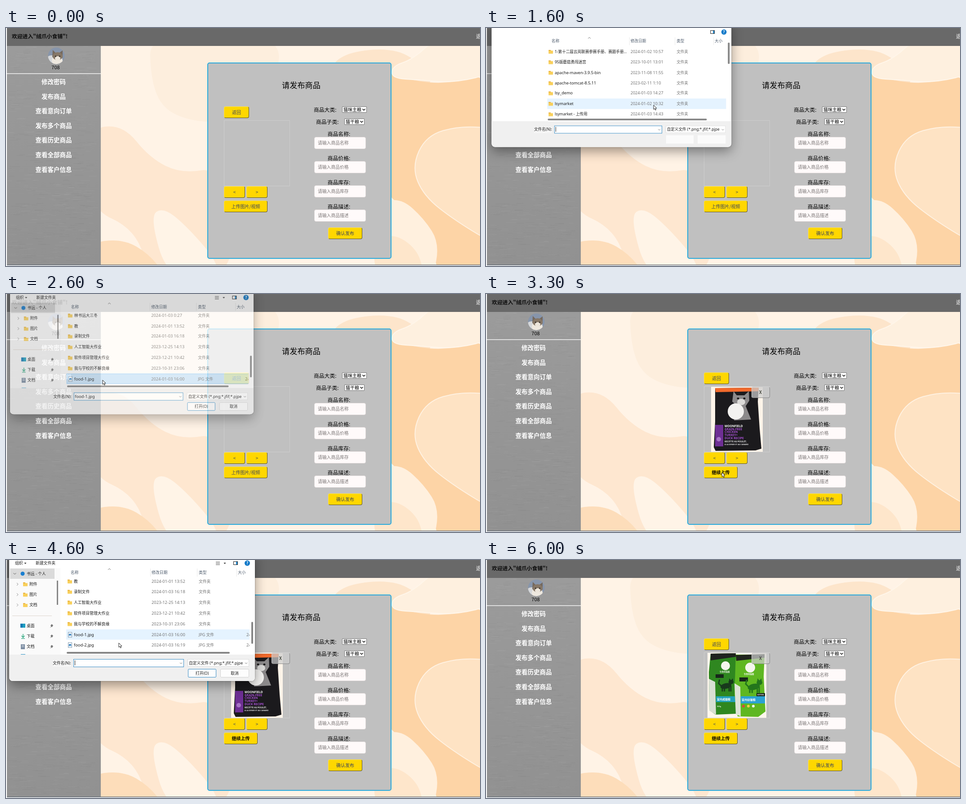
These frames come from a looping animation (1055 px wide and 531 px high, 8000 ms). An HTML page with a canvas:

```html
<!DOCTYPE html>
<html lang="zh-CN">
<head>
<meta charset="utf-8">
<style>
html, body { margin: 0; width: 100%; height: 100%; overflow: hidden; background: #fff; }
#stage { position: relative; width: 1055px; height: 531px; overflow: hidden;
  font-family: "Noto Sans CJK SC", "Noto Sans CJK", "Noto Sans", sans-serif; }
#stage div, canvas, svg { position: absolute; box-sizing: border-box; }
.t { white-space: pre; }
.btn { background: #ffd700; border-radius: 4px; border: 1px solid; border-color: #ffe24a #59532a #59532a #ffe24a; }
.field { background: #fffafa; border-radius: 4px; border: 1px solid #e2dcdc; }
.sel { background: #fff; border: 1px solid #767676; border-radius: 1px; }
.win { transform-origin: 230px 88px; }
.shade { border-radius: 8px; box-shadow: 0 10px 26px rgba(0,0,0,.38), 0 0 3px rgba(0,0,0,.35); }
.dialog { background: #fff; border-radius: 8px; overflow: hidden; }
</style>
</head>
<body>
<div id="stage"></div>
<script>
const stage = document.getElementById('stage');
const LATIN = '"Noto Sans","Noto Sans CJK SC",sans-serif';

function box(parent, x, y, w, h, css = '', cls = '') {
  const d = document.createElement('div');
  d.className = cls;
  d.style.cssText = `left:${x}px;top:${y}px;width:${w}px;height:${h}px;${css}`;
  parent.appendChild(d);
  return d;
}

// Text centred vertically on cy; with mid set, centred horizontally on x too.
function text(parent, x, cy, size, str, css = '', mid = false) {
  const d = box(parent, mid ? x - 150 : x, cy - 10, 300, 20,
    `font-size:${size}px;line-height:20px;text-align:${mid ? 'center' : 'left'};${css}`, 't');
  d.textContent = str;
  return d;
}

function canvas(parent, x, y, w, h) {
  const c = document.createElement('canvas');
  c.width = w; c.height = h;
  c.style.cssText = `left:${x}px;top:${y}px`;
  parent.appendChild(c);
  const g = c.getContext('2d');
  g.translate(-x, -y);
  return g;
}

function poly(g, color, ...p) {
  g.fillStyle = color;
  g.beginPath();
  for (let i = 0; i < p.length; i += 2) g.lineTo(p[i], p[i + 1]);
  g.closePath();
  g.fill();
}

function rect(g, color, x, y, w, h) { g.fillStyle = color; g.fillRect(x, y, w, h); }

function oval(g, color, x, y, rx, ry = rx, rot = 0) {
  g.fillStyle = color;
  g.beginPath();
  g.ellipse(x, y, rx, ry, rot, 0, 7);
  g.fill();
}

function line(g, color, width, ...p) {
  g.strokeStyle = color;
  g.lineWidth = width;
  g.beginPath();
  for (let i = 0; i < p.length; i += 2) g.lineTo(p[i], p[i + 1]);
  g.stroke();
}

// Smooth closed shape through the midpoints of p.
function blob(g, fill, edge, ...p) {
  const n = p.length / 2, at = i => [p[(i % n) * 2], p[(i % n) * 2 + 1]];
  g.beginPath();
  for (let i = 0; i <= n; i++) {
    const [ax, ay] = at(i), [bx, by] = at(i + 1);
    const mx = (ax + bx) / 2, my = (ay + by) / 2;
    i ? g.quadraticCurveTo(ax, ay, mx, my) : g.moveTo(mx, my);
  }
  g.fillStyle = fill;
  g.fill();
  if (edge) { g.strokeStyle = edge; g.lineWidth = 2; g.stroke(); }
}

function paintPage() {
  const g = canvas(stage, 0, 0, 1055, 531);
  rect(g, '#fff', 0, 0, 1055, 531);
  g.save();
  g.beginPath(); g.rect(211, 40, 844, 488); g.clip();
  rect(g, '#fff3e6', 211, 40, 844, 488);
  blob(g, '#fdeedd', null, 320, 10, 322, 110, 345, 175, 400, 205, 480, 212, 620, 90, 590, 10);
  blob(g, '#fee7d0', null, 180, 225, 260, 215, 320, 290, 390, 325, 480, 310, 520, 560, 320, 560, 290, 450, 180, 400);
  blob(g, '#fdddba', null, 180, 480, 260, 470, 320, 505, 360, 560, 180, 560);
  blob(g, '#fff4e7', null, 320, 420, 350, 400, 400, 440, 470, 520, 470, 560, 360, 560);
  blob(g, '#fde5cb', null, 720, 85, 760, 55, 840, 45, 900, 60, 960, 120, 900, 140, 760, 130);
  blob(g, '#fdd4a6', null, 830, 90, 900, 118, 990, 125, 1090, 95, 1090, 560, 960, 560, 950, 470, 880, 400, 830, 350);
  blob(g, '#fef0df', '#fff6ea', 860, 85, 905, 70, 960, 20, 1090, 20, 1090, 100, 1000, 122, 920, 116, 858, 112);
  blob(g, '#fee3c4', '#fff2e2', 1100, 225, 1010, 218, 935, 240, 903, 310, 930, 375, 1000, 430, 1100, 490);
  blob(g, '#fff0de', null, 830, 390, 880, 380, 930, 425, 965, 480, 950, 560, 830, 560);
  blob(g, '#fee6cb', null, 820, 470, 870, 460, 920, 500, 930, 560, 820, 560);
  g.restore();
  rect(g, '#696969', 2, 0, 1053, 40);
  const grey = g.createLinearGradient(0, 40, 0, 528);
  grey.addColorStop(0, '#9b9b9b');
  grey.addColorStop(1, '#919191');
  rect(g, grey, 2, 40, 209, 488);
  let seed = 7;
  const rnd = () => (seed = seed * 16807 % 2147483647) / 2147483647;
  for (let i = 0; i < 500; i++) {
    const x = 2 + rnd() * 185;
    rect(g, i % 2 ? 'rgba(255,255,255,.05)' : 'rgba(0,0,0,.04)', x, 40 + rnd() * 487, 8 + rnd() * 16, 1);
  }
  rect(g, '#f4f4f4', 2, 101, 209, 1.5);
  rect(g, '#5d6670', 2, 528, 1053, 1.5);
  // avatar
  g.save();
  g.beginPath(); g.arc(112, 62, 18.5, 0, 7); g.clip();
  rect(g, '#8795ab', 90, 40, 44, 44);
  oval(g, '#d5d7da', 101, 76, 14, 15);
  oval(g, '#eee8df', 114, 73, 12, 11);
  poly(g, '#75695e', 103, 65, 104, 49, 111, 56, 119, 55, 126, 50, 126, 66);
  oval(g, '#867767', 115, 63, 11, 9);
  oval(g, '#ece5db', 115, 68, 6, 5);
  oval(g, '#332f2c', 110.5, 63, 1.6);
  oval(g, '#332f2c', 119.5, 63, 1.6);
  g.restore();
}

function button(x, y, w, str, css = 'color:#39445c') {
  const b = box(stage, x, y, w, 26, '', 'btn');
  text(b, w / 2 - 1, 12, 10, str, 'font-weight:500;' + css, true);
  return b;
}

function select(x, y, w, str, label, lx) {
  text(stage, lx, y + 6.5, 11.8, label);
  const s = box(stage, x, y, w, 14, '', 'sel');
  text(s, 2, 6, 10, str);
  const g = canvas(s, w - 12, 2, 9, 9);
  line(g, '#111', 1.5, w - 10.5, 4.5, w - 7.5, 7.5, w - 4.5, 4.5);
}

function buildPage() {
  paintPage();
  text(stage, 13, 18, 11.8, '欢迎进入"绒爪小食铺"!', 'font-weight:700;color:#0c0c0c');
  text(stage, 1046, 18, 11.8, '退出', 'color:#fff');
  text(stage, 110.5, 87, 11, '708', '', true);
  ['修改密码', '发布商品', '查看意向订单', '发布多个商品', '查看历史商品', '查看全部商品', '查看客户信息']
    .forEach((s, i) => text(stage, 106, 119 + i * 32.6, 13.5, s, 'font-weight:700;color:#fff', true));
  box(stage, 448, 76.5, 410, 438, 'background:#c0c0c0;border:2px solid #27a9dc;border-radius:5px');
  text(stage, 657, 127, 17.2, '请发布商品', 'font-weight:500', true);
  button(485, 175, 56, '返回');
  box(stage, 485, 206, 147, 147, 'border:1px solid #cdcdcd');
  button(485, 353, 47, '<');
  button(535, 353, 47, '>');
  select(748, 175, 55, '猫咪主粮', '商品大类:', 685);
  select(753, 202, 45, '猫干粮', '商品子类:', 690);
  ['名称', '价格', '库存', '描述'].forEach((s, i) => {
    const y = 236 + i * 54;
    text(stage, 741, y, 11.8, `商品${s}:`, '', true);
    const f = box(stage, 686, y + 6.5, 115, 27, '', 'field');
    text(f, 7, 12.5, 9.8, '请输入商品' + s, 'color:#7a7676');
  });
  button(717, 445, 76, '确认发布');
}

function words(g, color, size, x, y, ...lines) {
  g.fillStyle = color;
  g.font = `700 ${size}px ${LATIN}`;
  lines.forEach((s, i) => g.fillText(s, x, y + i * 6.7));
}

function cat(g, color, x, y, k) {
  g.save();
  g.translate(x, y);
  g.scale(k, k);
  oval(g, color, 0, 0, 13, 6.5, -.2);
  oval(g, color, 12, -9, 6, 5);
  poly(g, color, 7, -11, 8, -18, 12, -13, 16, -18, 17.5, -10);
  [-10, -5, 6, 10].forEach(lx => rect(g, color, lx, 0, 3, 13));
  line(g, color, 3, -11, 0, -17, -6, -15, -15);
  g.restore();
}

function bagDark() {
  const g = canvas(stage, 486, 207, 145, 145);
  rect(g, '#fdf4e9', 501, 207, 115, 145);
  poly(g, '#1b1a1d', 510, 210, 607, 209, 605, 240, 609, 300, 613, 345, 600, 349, 511, 350, 507, 342, 510, 285);
  poly(g, '#f26a2c', 510, 210, 607, 209, 606, 217, 511, 219);
  poly(g, '#8c8a8b', 548, 240, 551, 217, 558, 226, 575, 226, 585, 217, 586, 238, 578, 250, 590, 280, 552, 282, 558, 249);
  oval(g, '#dcdbd9', 568, 241, 9, 7);
  oval(g, '#171717', 561, 233, 2.6, 2);
  oval(g, '#171717', 575, 233, 2.6, 2);
  oval(g, '#f3f2f0', 556, 262, 18);
  rect(g, '#6e2f94', 510, 292, 18, 48);
  oval(g, '#a673c4', 518, 324, 5);
  words(g, '#fff', 6.6, 531, 297, 'MOONFIELD');
  words(g, '#a54fd0', 6.6, 531, 303.5, 'GRAIN-FREE', 'CHICKEN', 'TURKEY+', 'DUCK RECIPE');
  words(g, '#eee', 4.8, 531, 331, 'RECETTE AU POULET,');
  words(g, '#eee', 4, 531, 337, 'A LA DINDE ET AU CANARD');
  return g.canvas;
}

function bagGreen() {
  const g = canvas(stage, 486, 207, 145, 145);
  rect(g, '#fdf6ec', 493, 207, 131, 145);
  poly(g, '#2f8720', 500, 209, 556, 208, 557, 343, 511, 345, 497, 335, 496, 250);
  poly(g, '#d9dfd3', 496, 265, 510, 272, 512, 345, 497, 336);
  poly(g, '#20241f', 500, 209, 556, 208, 556, 216, 500, 224);
  oval(g, '#f4f6ee', 533, 236, 10);
  words(g, '#e1edd9', 4.5, 520, 251, '生骨肉猫粮');
  rect(g, '#17261a', 511, 255, 18, 8);
  cat(g, '#183a1c', 534, 281, .95);
  rect(g, '#23a2ba', 512, 304, 44, 13);
  words(g, '#fff', 6, 514, 313, '室内成猫粮');
  words(g, '#e9f2e4', 4, 514, 328, '300g');
  poly(g, '#5fb722', 556, 211, 620, 211, 618, 260, 622, 338, 606, 350, 560, 349, 553, 300);
  poly(g, '#dde3d6', 553, 275, 566, 283, 567, 349, 556, 344);
  poly(g, '#22261f', 556, 212, 620, 210, 620, 218, 557, 225);
  oval(g, '#f4f6ee', 588, 240, 11);
  words(g, '#f2f8ec', 4.5, 574, 256, '生骨肉猫粮');
  rect(g, '#17261a', 564, 262, 19, 9);
  cat(g, '#23751c', 596, 283, 1.05);
  rect(g, '#18251b', 602, 297, 19, 7);
  words(g, '#fff', 4, 604, 302, 'KITTEN');
  poly(g, '#2ba3d2', 567, 304, 621, 304, 621, 320, 567, 320);
  words(g, '#fff', 6.2, 569, 314, '室内幼猫粮');
  ['#d94c36', '#f1cd4b', '#f4f4f4'].forEach((c, i) => oval(g, c, 573 + i * 11, 326, 3));
  return g.canvas;
}

const FILES = [
  ['1-第十二届云岚联赛参赛手册、赛题手册...', '2024-01-02 10:57'],
  ['95版蘑菇勇闯迷宫', '2023-10-01 13:01'],
  ['apache-maven-3.9.5-bin', '2023-11-08 11:55'],
  ['apache-tomcat-8.5.11', '2023-02-11 1:10'],
  ['lsy_demo', '2024-01-03 14:27'],
  ['lsymarket', '2024-01-02 10:32'],
  ['lsymarket - 上传用', '2024-01-03 14:43'],
  ['mysql-8.0.33', '2023-09-12 15:20'],
  ['vue_demo', '2023-11-20 9:41'],
  ['课程设计', '2023-12-11 16:05'],
  ['实验报告', '2023-12-18 20:36'],
  ['数据库', '2023-10-16 8:52'],
  ['林书远大三冬', '2024-01-03 0:27'],
  ['教', '2024-01-01 13:52'],
  ['录制文件', '2024-01-03 16:18'],
  ['人工智能大作业', '2023-12-25 14:13'],
  ['软件项目管理大作业', '2023-12-21 10:42'],
  ['我与学校的不解良缘', '2023-10-31 23:06'],
  ['food-1.jpg', '2024-01-03 16:00'],
  ['food-2.jpg', '2024-01-03 16:19']
];
const PITCH = 23.8, FOOD = 18;

function folder(g, x, y) {
  rect(g, '#e3a52c', x, y - 4, 5, 3);
  rect(g, '#f8cf5a', x, y - 2.5, 10, 7);
}

function label(parent, x, y, str, css = '') {
  const cjk = /[一-龥]/.test(str);
  return text(parent, x, y, cjk ? 8.8 : 9.3, str, `font-family:${LATIN};color:#1b1b1b;${css}`);
}

function buildDialog() {
  const win = box(stage, 0, 0, 1055, 531, '', 'win');
  box(win, 7, -20, 547, 290, '', 'shade');
  const frame = box(win, 7, -20, 547, 290, '', 'dialog');
  const d = box(frame, -7, 20, 600, 300);

  // file list
  const list = box(d, 0, 0, 600, 300);
  const view = box(list, 121, 36, 421, 168, 'overflow:hidden');
  const rows = box(view, -121, -36, 600, 600);
  const hits = FILES.map(([name, date], i) => {
    const y = 52.1 + i * PITCH, pic = i >= FOOD;
    const row = box(rows, 0, y - 11.9, 600, PITCH);
    const hit = box(row, 134, 0, 420, PITCH);
    const g = canvas(row, 136, 5, 14, 16);
    if (pic) {
      rect(g, '#8199ad', 138, 6, 9, 12);
      rect(g, '#fff', 139, 7, 7, 10);
      rect(g, '#2877b8', 140, 10, 5, 5);
      poly(g, '#bfe0f6', 140, 15, 143, 12, 145, 15);
    } else folder(g, 137, 12);
    label(row, 151, 12, name);
    label(row, 324, 12, date, 'color:#737373');
    label(row, 429, 12, pic ? 'JPG 文件' : '文件夹', 'color:#737373');
    if (pic) label(row, 535, 12, '24 KB', 'color:#737373');
    return { row, hit };
  });
  [[144, '名称'], [324, '修改日期'], [429, '类型'], [516, '大小']]
    .forEach(([x, s]) => label(list, x, 28, s, 'color:#4c5a6b'));
  [321, 425, 513].forEach(x => box(list, x, 19, 1, 18, 'background:#e8e8e8'));
  const top = canvas(list, 0, 0, 560, 40);
  line(top, '#777', 1, 227, 22, 230, 19, 233, 22);
  rect(top, '#222', 506, 3, 10, 8);
  rect(top, '#fff', 507, 4, 5, 6);
  rect(top, '#2a8cd0', 512, 4, 3, 6);
  oval(top, '#0f78c8', 537, 7, 6);
  text(list, 537, 7, 9, '?', 'color:#fff;font-weight:700', true);

  // scroll bars and empty footer
  box(d, 0, 211, 600, 80, 'background:#f0f0f0');
  box(d, 135, 205, 363, 3.5, 'background:#868686;border-radius:2px');
  const thumb = box(d, 546, 31, 3.5, 49, 'background:#868686;border-radius:2px');
  [[150, 221, 245, 18], [404, 221, 137, 17], [405, 243, 63, 19], [477, 243, 64, 19], [104, 224, 40, 14]]
    .forEach(([x, y, w, h], i) => box(d, x, y, w, h, `background:${i > 3 ? '#f6f6f6' : '#fbfbfb'}`));

  const foot = box(d, 0, 0, 600, 300);
  label(foot, 104, 230, '文件名(N):');
  box(foot, 150, 221, 246, 18, 'background:#fff;border:1px solid #3b8dc4');
  const name = label(foot, 152.5, 230, '');
  const caret = box(foot, 153, 224, 1, 11, 'background:#222');
  const filter = box(foot, 404, 221, 137, 17, 'background:#fff;border:1px solid #dcdcdc');
  const clip = box(filter, 2, 0, 120, 15, 'overflow:hidden');
  label(clip, 0, 8, '自定义文件 (*.png;*.jfif;*.pjpeg;*.jpg)');
  const fg = canvas(foot, 380, 222, 160, 16);
  [389.5, 534.5].forEach(x => line(fg, '#777', 1, x - 2.5, 229, x, 231.5, x + 2.5, 229));

  // toolbar, side pane and buttons
  const full = box(d, 0, 0, 600, 300);
  box(full, 7, 18, 114, 193, 'background:#fafafa');
  box(full, 9, 19, 99, 23, 'background:#dadada');
  const g = canvas(full, 0, 0, 560, 211);
  label(full, 20, 7, '组织');
  label(full, 66, 7, '新建文件夹');
  label(full, 46, 30.5, '书远 - 个人');
  [43, 487].forEach(x => poly(g, '#333', x - 2.5, 6, x + 2.5, 6, x, 9));
  [4, 7, 10].forEach(y => rect(g, '#555', 467, y, 9, 1));
  line(g, '#555', 1, 16.5, 29, 19.5, 32, 22.5, 29);
  oval(g, '#1a7fd0', 37, 30.5, 4.5);
  ['附件', '图片', '文档'].forEach((s, i) => {
    const y = 54 + i * 23.2;
    line(g, '#888', 1, 24, y - 3, 27, y, 24, y + 3);
    folder(g, 38, y);
    label(full, 52, y, s);
  });
  rect(g, '#ddd5cd', 14, 124, 88, 1);
  rect(g, '#868686', 113, 46, 3, 54);
  ['桌面', '下载', '文档'].forEach((s, i) => {
    const y = 147 + i * 23.2;
    label(full, 46, y, s);
    line(g, '#777', 1, 98.5, y + 3.5, 101, y + 1);
    poly(g, '#777', 99, y - 1, 102, y - 4, 105, y - 1, 102, y + 3);
  });
  rect(g, '#1c9fc0', 32, 142, 11, 9);
  rect(g, '#1279b4', 32, 142, 5, 9);
  line(g, '#2aa57c', 1.4, 38, 165, 38, 173);
  line(g, '#2aa57c', 1.4, 34.5, 169, 38, 173, 41.5, 169);
  rect(g, '#2aa57c', 34, 174.5, 8, 1.3);
  rect(g, '#7c8da2', 33, 188, 9, 11);
  rect(g, '#eef2f6', 35, 190, 5, 1);
  rect(g, '#eef2f6', 35, 193, 5, 1);
  rect(g, '#2b93c6', 33, 210, 10, 1);
  const action = (x, w, s, edge) => {
    const b = box(full, x, 243, w, 19, `background:#fdfdfd;border:1px solid ${edge};border-radius:2px`);
    label(b, w / 2 - 151, 8.5, s, 'text-align:center');
  };
  action(405, 63, '打开(O)', '#3b8dc4');
  action(477, 64, '取消', '#d2d2d2');
  return { win, list, rows, hits, thumb, foot, name, caret, full };
}

buildPage();
const firstUpload = button(485, 385, 97, '上传图片/视频');
const moreUpload = button(485, 385, 75, '继续上传', 'color:#000;font-weight:700');
const dark = bagDark(), green = bagGreen();
const drop = box(stage, 591, 207, 41, 25,
  'background:rgba(205,205,205,.72);border-radius:4px;border:1px solid;border-color:#ccc #888 #888 #ccc');
text(drop, 19, 11, 10, 'X', 'font-weight:600;color:#4c4f46', true);
const ui = buildDialog();

const arrow = box(stage, 0, 0, 10, 14);
arrow.innerHTML = '<svg width="10" height="14" viewBox="-1 -1 10 14"><path d="M0 0V9.6L2.3 7.7L3.8 11.2L5.5 10.5L4 7H6.9Z" fill="#fff" stroke="#111" stroke-width=".9"/></svg>';

// time, x, y
const PATH = [
  [100, 1036, 512], [900, 532, 391], [1300, 532, 391], [1600, 373, 172], [1900, 350, 166],
  [2400, 215, 192], [2600, 215, 192], [2700, 264, 199], [3100, 525, 398], [3400, 525, 398],
  [3600, 300, 214], [4000, 190, 152], [4300, 205, 162], [4600, 251, 185], [4800, 245, 190],
  [5100, 232, 191], [5500, 681, 290], [5700, 630, 258], [5800, 630, 258], [5900, 930, 271]
];
const clamp = v => Math.max(0, Math.min(1, v));
const ease = v => v * v * (3 - 2 * v);
const show = (e, on) => { e.style.display = on ? 'block' : 'none'; };

function moveArrow(t) {
  const i = PATH.findIndex(p => p[0] >= t);
  show(arrow, t >= 100 && i >= 0);
  if (i < 0) return;
  const b = PATH[i], a = PATH[Math.max(0, i - 1)];
  const k = b === a ? 1 : ease(clamp((t - a[0]) / (b[0] - a[0])));
  arrow.style.transform = `translate(${a[1] + (b[1] - a[1]) * k - 1}px,${a[2] + (b[2] - a[2]) * k - 1}px)`;
}

function moveDialog(t) {
  const second = t >= 3700;
  const [open, scroll, pick, close] = second ? [3900, 4200, 4700, 4990] : [1400, 1900, 2400, 2540];
  const age = t - open, leave = Math.max(0, t - close) / 110;
  const alpha = Math.min(1, .4 + age * .004) - .85 * leave ** 2;
  const on = age >= 0 && alpha > 0;
  show(ui.win, on);
  if (!on) return;
  const scale = 1 - .104 * (1 - clamp(age / 400)) ** 2.1 - .05 * leave ** 2.8;
  ui.win.style.opacity = alpha;
  ui.win.style.transform = `scale(${scale})`;
  show(ui.list, age >= 200);
  show(ui.foot, age >= 200);
  show(ui.full, age >= 300);

  const last = second ? FOOD + 1 : FOOD;
  const k = ease(clamp((t - scroll) / (second ? 200 : 400)));
  ui.rows.style.transform = `translateY(${-k * (52.1 + last * PITCH - 190)}px)`;
  ui.thumb.style.top = 31 + k * 107 + 'px';
  const picked = t >= pick;
  const hover = k === 0 ? 5 : k === 1 ? FOOD : -1;
  ui.hits.forEach(({ row, hit }, i) => {
    show(row, i <= last);
    const sel = picked && i === last;
    hit.style.background = sel ? '#cce8ff' : !picked && i === hover ? '#e5f3ff' : 'none';
    hit.style.border = sel ? '1px solid #99d1ff' : 'none';
  });
  ui.name.textContent = picked ? FILES[last][0] : '';
  show(ui.caret, !picked);
}

function draw(now) {
  // the picture advances in steps of 100 ms and rests at the end
  const t = Math.min(6000, Math.floor((now % 8000) / 100) * 100);
  const loaded = t >= 2700;
  show(firstUpload, !loaded);
  show(moreUpload, loaded);
  show(drop, loaded);
  show(dark, loaded && t < 5200);
  show(green, t >= 5200);
  moveDialog(t);
  moveArrow(t);
}

const start = performance.now();
function tick() {
  draw(performance.now() - start);
  requestAnimationFrame(tick);
}
tick();
</script>
</body>
</html>
```
